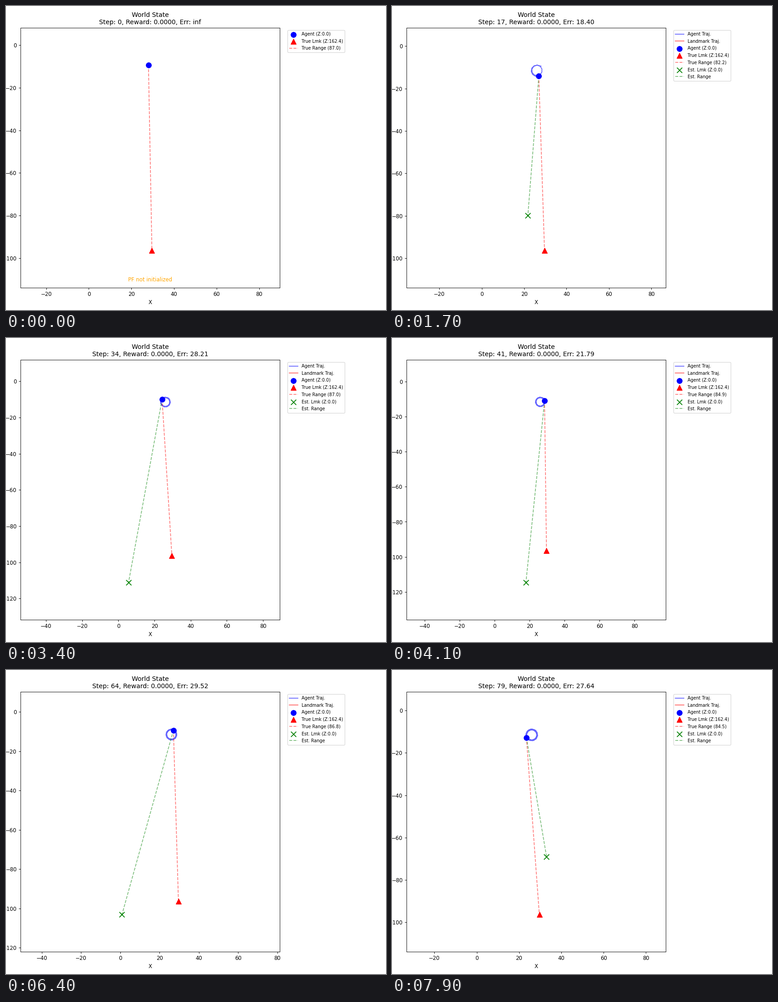
Recreate the animation shown at these times as a matplotlib script. Size 837 by 669 pixels, loop 8000 ms.

```python
import numpy as np
import matplotlib.pyplot as plt
from matplotlib.animation import FuncAnimation

W, H = 837, 669
DPI = 83.7
STEPS = 80
INTERVAL = 100

LANDMARK = np.array([29.6, -96.4])
CENTER = np.array([26.0, -11.5])
TURN = 33.5       # degrees the agent circles per step
RANGE_LAG = 0.4   # the range is measured a little before the pose

# Turning points of the drifting estimate: (step, x, y)
DRIFT = [(1, 19, -72), (17, 21.74, -79.763), (27, -6.6, -107.758),
         (41, 17.84, -114.744), (51, 2.4, -101.64), (64, 0.85, -103.1),
         (79, 33, -68.97)]


def agent_at(t):
    """Circle with a slowly breathing radius, entered from slightly outside."""
    angle = np.radians(80 + TURN * t - TURN * np.exp(-t / 4))
    radius = 2.6 + 0.2 * np.cos(np.pi * (t - 79) / 15) + 0.4 * np.exp(-t)
    return CENTER + np.column_stack([radius * np.cos(angle), radius * np.sin(angle)])


def distance(a, b):
    return np.hypot(*(a - b).T)


steps = np.arange(STEPS)
agent = agent_at(steps)
true_range = distance(agent_at(np.maximum(steps - RANGE_LAG, 0)), LANDMARK)
key_step, key_x, key_y = np.transpose(DRIFT)
estimate = np.column_stack([np.interp(steps, key_step, k) for k in (key_x, key_y)])
error = distance(estimate, LANDMARK)

plt.rcParams["font.family"] = "DejaVu Sans"
fig = plt.figure(figsize=((W + 1e-3) / DPI, (H + 1e-3) / DPI), dpi=DPI,
                 facecolor="white")
ax = fig.add_axes([31.8 / W, 1 - 620 / H, 571.6 / W, 571.6 / H])


def segment(a, b, color, label):
    ax.plot([a[0], b[0]], [a[1], b[1]], "--", color=color, alpha=0.5, label=label)


def marker(p, shape, color, label):
    ax.scatter(*p, s=100, c=color, marker=shape, label=label, zorder=5)


def fit_view(points):
    lo, hi = points.min(axis=0), points.max(axis=0)
    mid, half = (lo + hi) / 2, 0.7 * (hi - lo).max()
    ax.set_xlim(mid[0] - half, mid[0] + half)
    ax.set_ylim(mid[1] - half, mid[1] + half)


def draw(i):
    ax.clear()
    path = agent[:i + 1]
    points = np.vstack([path, LANDMARK])
    started = i > 0

    if started:
        ax.plot(*path.T, "b-", alpha=0.6, label="Agent Traj.")
        ax.plot(*np.tile(LANDMARK, (2, 1)).T, "r-", alpha=0.6, label="Landmark Traj.")
    marker(agent[i], "o", "blue", "Agent (Z:0.0)")
    marker(LANDMARK, "^", "red", "True Lmk (Z:162.4)")
    segment(agent[i], LANDMARK, "red", f"True Range ({true_range[i]:.1f})")

    if started:
        marker(estimate[i], "x", "green", "Est. Lmk (Z:0.0)")
        segment(agent[i], estimate[i], "green", "Est. Range")
        points = np.vstack([points, estimate[i]])
        err = f"{error[i]:.2f}"
    else:
        ax.text(0.5, 0.02, "PF not initialized", color="orange", ha="center",
                va="bottom", transform=ax.transAxes)
        err = "inf"

    fit_view(points)
    ax.set_xlabel("X")
    ax.set_title(f"World State\nStep: {i}, Reward: 0.0000, Err: {err}", pad=7)
    ax.legend(loc="upper left", bbox_to_anchor=(1.02, 1), fontsize="small",
              labelspacing=0.58)
    return []


anim = FuncAnimation(fig, draw, frames=STEPS, interval=INTERVAL,
                     init_func=lambda: [], repeat=True, repeat_delay=0)
plt.show()
```
